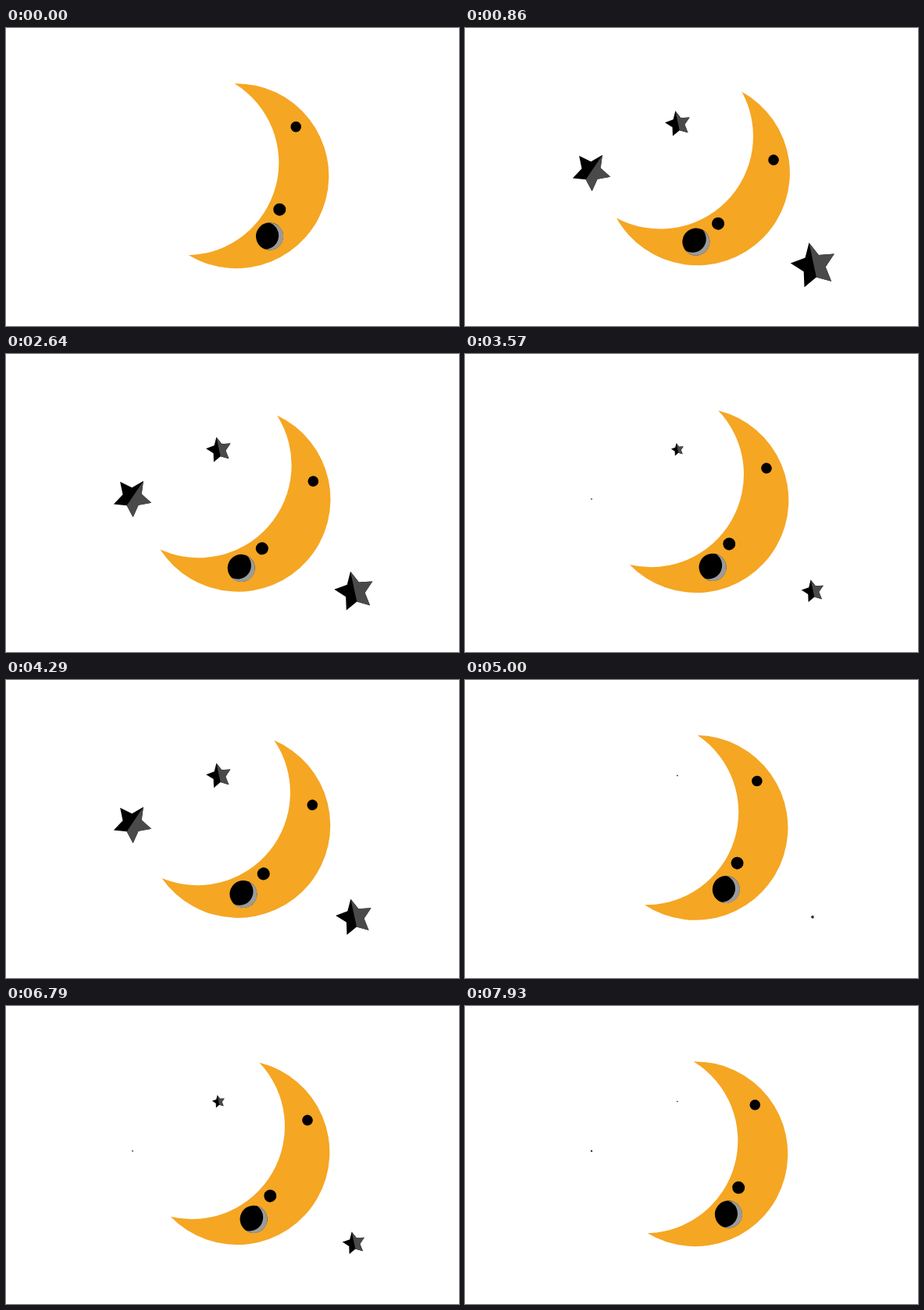
An HTML page for the animation above (8000 ms loop, 580x382 px).

```html
<!DOCTYPE html>
<html lang="en">
<head>
<meta charset="utf-8">
<title>Rocking moon</title>
<style>
  html, body { margin: 0; width: 100%; height: 100%; overflow: hidden; background: #fff; }
  svg { display: block; width: 100%; height: 100%; }
</style>
</head>
<body>
<svg id="stage" viewBox="0 0 580 382">
  <g id="moon">
    <path fill="#f5a623" d="M292.5 71.2A118.5 118.5 0 1 1 233.9 291.3A118.8 118.8 0 0 0 292.5 71.2Z"/>
    <circle cx="371.2" cy="126.6" r="6.8"/>
    <circle cx="350.3" cy="232.7" r="8"/>
    <circle cx="337.5" cy="267" r="17.5"/>
    <path fill="#9b9b9b" d="M337.5 249.6A17.5 17.5 0 1 1 331.8 283.6A17.5 17.5 0 0 0 337.5 249.6Z"/>
  </g>
</svg>
<script>
  const LOOP = 8000, STEP = 1000 / 14;
  const CYCLE = 45;              // ticks per swing, two ticks per step
  const PIVOT = '303.5 192.5';
  const SWING = 30;

  const stage = document.getElementById('stage');
  const moon = document.getElementById('moon');

  // grow and shrink are the ticks at which each move begins; span is its length
  const rock = { grow: 0, shrink: 23, span: 22 };
  const stars = [
    { x: 162, y: 186, radius: 25.4, tilt: 34, grow: 7.7, shrink: 31.7, span: 15 },
    { x: 271.8, y: 122.4, radius: 17, tilt: -12, grow: 1, shrink: 27.8, span: 20 },
    { x: 444.8, y: 303.7, radius: 30.2, tilt: -12, grow: 0, shrink: 23, span: 22 }
  ];

  function addShape(parent, name, attrs) {
    const el = document.createElementNS('http://www.w3.org/2000/svg', name);
    for (const key in attrs) el.setAttribute(key, attrs[key]);
    return parent.appendChild(el);
  }

  // Star corners, shifted so that the bounding box is centred on the origin
  function starPoints(radius, tilt) {
    const points = Array.from({ length: 10 }, (_, i) => {
      const a = (tilt - 90 + i * 36) * Math.PI / 180;
      const r = i % 2 ? radius * 0.5 : radius;
      return [r * Math.cos(a), r * Math.sin(a)];
    });
    const middle = axis => {
      const values = points.map(p => p[axis]);
      return (Math.min(...values) + Math.max(...values)) / 2;
    };
    const mx = middle(0), my = middle(1);
    return points.map(([x, y]) => [x - mx, y - my]);
  }

  for (const star of stars) {
    const points = starPoints(star.radius, star.tilt);
    star.el = addShape(stage, 'g', {});
    addShape(star.el, 'polygon', { points: points.join(' ') });
    addShape(star.el, 'polygon', { points: points.slice(0, 6).join(' '), fill: '#4a4a4a' });
  }

  function easeInOut(t) {
    t = Math.min(1, Math.max(0, t));
    return t < 0.5 ? 4 * t ** 3 : 1 - 4 * (1 - t) ** 3;
  }

  function level(move, tick) {
    if (tick < move.grow) tick += CYCLE;
    return easeInOut((tick - move.grow) / move.span)
         - easeInOut((tick - move.shrink) / move.span);
  }

  function draw(time) {
    const step = Math.floor(((time + 5) % LOOP) / STEP);
    const tick = (step * 2 + 1) % CYCLE;
    moon.setAttribute('transform', `rotate(${SWING * level(rock, tick)} ${PIVOT})`);
    for (const star of stars) {
      const size = level(star, tick);
      star.el.setAttribute('visibility', size > 0.01 ? 'visible' : 'hidden');
      star.el.setAttribute('transform', `translate(${star.x} ${star.y}) scale(${size})`);
    }
  }

  const start = performance.now();
  function play() {
    draw(performance.now() - start);
    requestAnimationFrame(play);
  }
  play();
</script>
</body>
</html>
```
